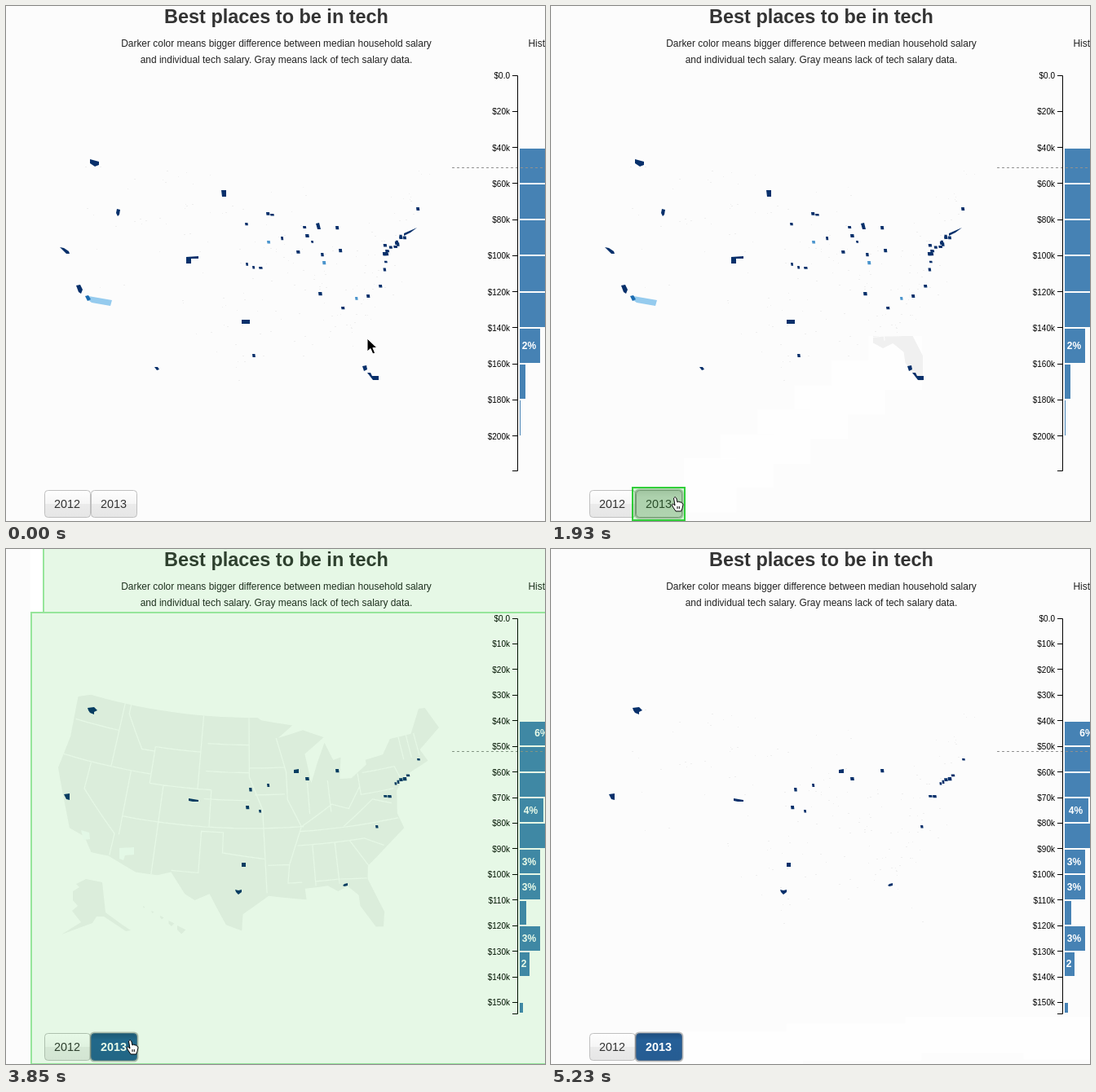
Animation of 661x632 px, one loop 5.67 s. Source, as an HTML page:

```html
<!DOCTYPE html>
<html lang="en">
<head>
<meta charset="utf-8">
<title>Tech salaries</title>
<style>
html, body { margin: 0; width: 100%; height: 100%; overflow: hidden; background: #fcfcfc; }
svg { display: block; width: 100%; height: 100%; font-family: "Liberation Sans", Arial, sans-serif; }
.mid { text-anchor: middle; }
.axis { fill: none; stroke: #000; }
.tick { font-size: 10px; text-anchor: end; }
.pct { font-size: 12px; font-weight: bold; fill: #fff; text-anchor: middle; }
.flash rect { fill: #00ce00; fill-opacity: .22; stroke: #00c30c; stroke-width: 2; }
</style>
</head>
<body>
<svg id="stage" viewBox="0 0 661 632">
  <defs>
    <linearGradient id="plain" x2="0" y2="1">
      <stop stop-color="#fefefe"/><stop offset=".5" stop-color="#f5f5f5"/>
      <stop offset=".5" stop-color="#ebebeb"/><stop offset="1" stop-color="#e6e6e6"/>
    </linearGradient>
    <linearGradient id="down" x2="0" y2="1">
      <stop stop-color="#c4c4c4"/><stop offset=".25" stop-color="#d2d2d2"/><stop offset="1" stop-color="#d6d6d6"/>
    </linearGradient>
    <linearGradient id="chosen" x2="0" y2="1">
      <stop stop-color="#1f4f80"/><stop offset=".25" stop-color="#265f97"/><stop offset="1" stop-color="#265c92"/>
    </linearGradient>
    <clipPath id="land"><path id="landShape"/></clipPath>
    <clipPath id="corner"><rect x="395" y="405" width="61" height="55"/></clipPath>
    <g id="country"></g>
  </defs>
  <rect width="661" height="632" fill="#fcfcfc"/>
  <g id="trail" fill="#fefefe"></g>
  <rect id="margin" x="30" width="15" height="77" fill="#fff"/>
  <g id="specks" clip-path="url(#land)" fill="#eee"></g>
  <use id="map" href="#country"/>
  <use id="florida" href="#country" clip-path="url(#corner)"/>
  <g id="year2012"></g>
  <g id="year2013"></g>
  <text class="mid" x="331.5" y="21" font-size="23.45" font-weight="bold" fill="#333">Best places to be in tech</text>
  <g font-size="11.95" fill="#222">
    <text class="mid" x="331.5" y="50">Darker color means bigger difference between median household salary</text>
    <text class="mid" x="331.5" y="70">and individual tech salary. Gray means lack of tech salary data.</text>
    <text x="640.5" y="50">Histogram</text>
  </g>
  <path class="axis" d="M621 85.5H627.5V570.5H621"/>
  <g font-size="14.4" fill="#333">
    <rect x="47.5" y="594.5" width="56" height="33" rx="4" fill="url(#plain)" stroke="#bfbfbf"/>
    <text class="mid" x="75" y="616">2012</text>
    <rect id="glow" x="104" y="594" width="57" height="34" rx="4" fill="none" stroke="#000" stroke-opacity=".25" stroke-width="3"/>
    <rect id="button" x="104.5" y="594.5" width="56" height="33" rx="4"/>
    <text id="label" class="mid" x="132" y="616">2013</text>
  </g>
  <g id="buttonFlash" class="flash"><rect x="100" y="591" width="64" height="40"/></g>
  <g id="pageFlash" class="flash">
    <rect x="46" y="-4" width="640" height="82"/>
    <rect x="31" y="78" width="640" height="554"/>
  </g>
  <path id="arrow" d="M0 0V16L4 12.5 6.8 19 9.6 17.8 6.9 11.5H12Z" fill="#000" stroke="#fff"/>
  <path id="hand" d="M-1.5 1Q0-2 1.8 1L3 6Q5 4 6 6 8 5 8.4 7 10 7 10 9L9 13.5 7.6 17H1L-3 11Q-4.6 8-2.4 8L0 10ZM3 11v3M5.3 11v3" fill="#fff" stroke="#000"/>
</svg>
<script>
const LOOP = 5670;
const HOVER = 1010, REPAINT = 1230, PRESS = 1780, SWITCH = 3390, FADE = 770;
const NAVY = '#08306b', BLUE = '#4b95cd';
const $ = id => document.getElementById(id);

function add(parent, tag, attrs, text) {
  const el = document.createElementNS('http://www.w3.org/2000/svg', tag);
  for (const key in attrs) el.setAttribute(key, attrs[key]);
  if (text) el.textContent = text;
  parent.append(el);
  return el;
}

let seed = 7;
const random = () => (seed = seed * 16807 % 2147483647) / 2147483647;
const between = (a, b) => a + (b - a) * random();

// Albers equal-area conic, standard parallels 29.5 and 45.5
const rad = Math.PI / 180, sin1 = Math.sin(29.5 * rad);
const cone = (sin1 + Math.sin(45.5 * rad)) / 2;
const offset = 1 - sin1 * sin1 + 2 * cone * sin1;
function project(lon, lat) {
  const radius = 647 * Math.sqrt(offset - 2 * cone * Math.sin(lat * rad)) / cone;
  const angle = cone * (lon + 96) * rad;
  return [302.5 + radius * Math.sin(angle), radius * Math.cos(angle) - 506];
}

// Lines run straight in longitude and latitude, so parallels bend on the map
function geoPath(text) {
  const nums = text.trim().split(/\s+/).map(Number);
  const out = [];
  for (let i = 0; i + 3 < nums.length; i += 2) {
    const [lon, lat, lon2, lat2] = nums.slice(i, i + 4);
    const parts = Math.ceil(Math.abs(lon2 - lon) / 2) || 1;
    for (let k = i ? 1 : 0; k <= parts; k++) {
      const point = project(lon + (lon2 - lon) * k / parts, lat + (lat2 - lat) * k / parts);
      out.push(point.map(v => v.toFixed(1)).join(' '));
    }
  }
  return 'M' + out.join('L');
}

// Key points of the coast, clockwise from the north-west
const mainland = geoPath(`-124.7 48.4 -122.8 49 -95.2 49 -94.6 48.7 -89.6 48 -92 46.7 -88 47.4 -84.8 46.4 -88 44.8
  -87.4 41.6 -86.3 43.6 -84.8 45.8 -83.8 43.8 -82.6 44 -83.2 41.7 -81.5 41.6 -79 42.8 -79 43.3 -76.3 43.5 -74.7 45
  -71.4 45 -69.2 47.4 -68.2 47.3 -67 44.8 -70.7 43.1 -70 41.7 -74 40.7 -75.4 39.4 -76 37 -75.5 35.3 -78 33.9
  -81.1 32 -81.4 30.6 -80 26.8 -80.4 25.2 -81.3 25.3 -82.8 27.8 -82.8 29 -84 30.1 -85.3 29.7 -86.5 30.4
  -89.4 30.3 -89.3 29.1 -94 29.7 -97.2 27.7 -97.3 25.9 -99.2 26.5 -101.4 29.8 -103.2 29 -104.5 29.6 -106.5 31.8
  -108.2 31.3 -111 31.3 -114.8 32.5 -117.1 32.5 -118.4 34 -120.6 34.5 -121.9 36.6 -124.4 40.4 -124 44`) + 'Z';

const borders = [
  '-124 46 -117 46', '-124.3 42 -111 42', '-111 45 -104 45', '-111 41 -102 41', '-114 37 -89 37',
  '-117 42 -117 49', '-120 42 -120 39 -114.6 35 -114.7 32.6', '-114 35 -114 42',
  '-116 49 -116 48 -113 44.5 -111 44.5', '-111 41 -111 45', '-109 31.3 -109 41', '-104 41 -104 49',
  '-102 41 -102 37', '-106.5 32 -103 32 -103 36.5 -100 36.5 -100 34.3 -94.5 33.7',
  '-96.6 49 -96.5 42.5 -94.6 39 -94.2 30', '-96.5 43.5 -91.2 43.5', '-95.7 40.6 -91.4 40.6',
  '-92.3 46.7 -91 43 -91 40 -89.3 37 -91.2 33 -91.5 31 -89.7 31', '-94 33 -91.2 33',
  '-89.3 37 -84.8 39.1 -82.5 38.4 -80.5 40.6', '-89.5 36.5 -76 36.5', '-90 35 -83 35 -81 32',
  '-83 35 -81 35 -78.6 33.9', '-88 31 -85 31 -81.5 30.7', '-83.5 36.6 -79 39 -76.5 38.2',
  '-80.5 42 -80.5 39.7 -75.8 39.7', '-79.8 42 -75 42 -74.5 40.7'
].map(geoPath);
for (let lat = 40; lat <= 46; lat += 3) borders.push(geoPath(`-103 ${lat} -96.5 ${lat}`));
for (let lon = -88; lon <= -85; lon += 3) borders.push(geoPath(`${lon} 30.5 ${lon} 35`), geoPath(`${lon} 38.3 ${lon} 41.7`));
for (let lon = -73.4; lon < -70; lon += 1.2) borders.push(geoPath(`${lon} 42.5 ${lon} 45`));

const islands = [0, 1, 2, 3, 4].map(i => {
  const r = 1.2 + i * i * .25;
  return `M${168 + 10.5 * i} ${438 + 6 * i}l${2 * r} ${r}l${-r} ${r}l${-r} ${-r}z`;
}).join('');
const alaska = 'M82 420l8-5-4-4 12-6 20 4 4 37 19 14 12 8-6 1-27-18-9 0-5 8-38 14 24-15-11-14 7-6-6-7z';

$('landShape').setAttribute('d', mainland);
add($('country'), 'path', { d: mainland + alaska + islands, fill: '#f0f0f0' });
add($('country'), 'path', { d: borders.join(''), fill: 'none', stroke: '#fcfcfc', 'stroke-width': 1.2 });
add($('country'), 'path', { d: 'M92 345l10 3 1 8-8 1zM139 367l18-1v9l-11 1-2 6-5-2z', fill: '#f9fcfc' });

for (let i = 0; i < 320; i++) {
  const x = Math.round(60 + 460 * Math.sqrt(random())), y = Math.round(between(185, 470));
  add($('specks'), 'rect', { x, y, width: 1 + Math.round(random()), height: 1 });
}

function counties(group, spots, fill = NAVY) {
  const d = spots.map(([x, y]) => {
    const w = between(2.5, 4.5), h = between(2.5, 4.5);
    return `M${x} ${y}h${w}l.5 ${h}h${-w}z`;
  }).join('');
  add(group, 'path', { d, fill });
}

const scatter = (count, [x0, y0], [x1, y1], spread) => Array.from({ length: count }, (_, i) => {
  const k = i / (count - 1);
  return [x0 + (x1 - x0) * k + between(-spread, spread), y0 + (y1 - y0) * k + between(-spread, spread)];
});

function histogram(group, { step, unit, count, bars, median }) {
  const at = i => 85.5 + i * step, edge = i => Math.round(at(i) + .5);
  for (let i = 0; i <= count; i++) {
    add(group, 'path', { class: 'axis', d: `M621 ${Math.round(at(i)) - .5}h6` });
    add(group, 'text', { class: 'tick', x: 618, y: at(i) + 3.5 }, i ? `$${i * unit}k` : '$0.0');
  }
  for (const [bin, width, text] of bars) {
    const height = Math.min(edge(bin + 1) - 2, 569) - edge(bin);
    add(group, 'rect', { x: 630, y: edge(bin), width, height, fill: '#4682b4' });
    if (text) add(group, 'text', { class: 'pct', x: 629 + width / 2, y: at(bin) + step / 2 + 3.5 }, text);
  }
  add(group, 'path', { d: `M547 ${median}H661`, stroke: '#909090', 'stroke-dasharray': '3 3' });
}

const y12 = $('year2012'), y13 = $('year2013');
const bothYears = [[367, 280], [404, 270], [294, 315], [310, 320]];

add(y12, 'path', { fill: NAVY, d: 'M103 188l11 3v4l-5 2-6-4zM136 249l4 1-1 6-2 2-2-4zM264 226h6v8h-5zM66 296l5 1 6 4 1 3h-4zM86 343l5-1 3 6-2 5-3-2zM182 443l4 0 2 3-3 1zM221 308l15-1v3h-9v6h-6zM289 385h10v5h-10zM380 267l4-1 2 8h-4zM488 279l16-7-8 6-8 4zM437 442l5-1 1 5-4 2zM443 450h4l2 4h8v5h-7z' });
add(y12, 'path', { fill: '#95cbee', d: 'M101 356l29 5-2 7-23-4-4-3z' });
add(y12, 'path', { fill: '#1c6cb1', d: 'M97 356l4-1 3 5-4 2z' });
counties(y12, [...bothYears, [293, 266], [319, 253], [324, 255], [337, 283], [356, 300], [302, 319], [302, 427],
  [364, 270], [374, 288], [386, 303], [408, 298], [383, 351], [411, 369], [442, 354], [457, 342], [503, 247]]);
counties(y12, scatter(12, [462, 304], [487, 280], 2.5));
counties(y12, scatter(4, [462, 322], [464, 292], 1.5));
counties(y12, [[320, 288], [388, 313], [428, 357]], BLUE);

add(y13, 'path', { fill: NAVY, d: 'M100 195l8-1 4 4-4 2v3l-5-2-2-3zM71 301l7-1v8l-4-1zM224 306l12 2v2h-7l-5-1zM289 385h5v5h-5zM353 271l6-1v5h-6zM281 418l4 1 4-1v3l-4 3-3-3zM413 413l2-2 4-1v3l-4 1z' });
counties(y13, [...bothYears, [298, 293], [320, 288], [453, 339], [504, 257]]);
counties(y13, scatter(5, [476, 287], [490, 277], 1));
counties(y13, scatter(2, [463, 302], [468, 302], 0));

histogram(y12, {
  step: 44.27, unit: 20, count: 10, median: 198.5,
  bars: [[2, 40], [3, 40], [4, 40], [5, 40], [6, 40], [7, 25, '2%'], [8, 7], [9, 1]]
});
histogram(y13, {
  step: 31.43, unit: 10, count: 15, median: 248.5,
  bars: [[4, 56, '6%'], [5, 60], [6, 60], [7, 29, '4%'], [8, 60], [9, 25, '3%'], [10, 25, '3%'],
    [11, 8], [12, 25, '3%'], [13, 12, '2'], [15, 4]]
});

// Pointer stops: [time, x, y]
const stops = [[360, 443, 408], [910, 171, 588], [1080, 152, 603], [4250, 152, 603],
  [4600, 590, 577], [4670, 652, 591], [4950, 649, 606], [5230, 638, 634]];

function pointerAt(t) {
  const i = stops.findIndex(s => s[0] > t);
  if (i === 0) return stops[0].slice(1);
  if (i < 0) return stops[stops.length - 1].slice(1);
  const [t0, x0, y0] = stops[i - 1], [t1, x1, y1] = stops[i];
  const k = (t - t0) / (t1 - t0);
  return [x0 + (x1 - x0) * k, y0 + (y1 - y0) * k];
}

// Faint lighter patches, each around the stretch the pointer has just covered
const patches = [];
function leaveTrail(from, to, until, step) {
  for (let t = from; t < to; t += step) {
    const [xa, ya] = pointerAt(t), [xb, yb] = pointerAt(t + step);
    const el = add($('trail'), 'rect', {
      x: Math.min(xa, xb) - 8, y: Math.min(ya, yb) - 3,
      width: Math.abs(xb - xa) + 20, height: Math.abs(yb - ya) + 36
    });
    patches.push({ from: t + step, until, el });
  }
}
leaveTrail(360, 910, SWITCH, 92);
leaveTrail(4250, 4600, LOOP, 116);

const show = (el, on) => el.setAttribute('visibility', on ? 'visible' : 'hidden');
const fade = (t, start) => t < start ? 0 : Math.max(0, 1 - (t - start) / FADE);

function draw(t) {
  const switched = t >= SWITCH, pressed = t >= PRESS;
  const tint = fade(t, SWITCH);
  show(y12, !switched);
  show(y13, switched);
  show($('map'), tint > 0);
  show($('margin'), tint > 0);
  show($('specks'), tint === 0);
  show($('florida'), t >= 400 && !switched);
  patches.forEach(p => show(p.el, t >= p.from && t < p.until));

  const button = $('button'), label = $('label');
  button.setAttribute('fill', switched ? 'url(#chosen)' : pressed ? 'url(#down)' : t >= HOVER ? '#e6e6e6' : 'url(#plain)');
  button.setAttribute('stroke', switched ? '#4a6a8c' : pressed ? '#909090' : '#bfbfbf');
  label.setAttribute('fill', switched ? '#fff' : '#333');
  label.setAttribute('font-weight', switched ? 'bold' : 'normal');
  show($('glow'), pressed);

  $('buttonFlash').setAttribute('opacity', switched ? 0 : fade(t, pressed ? PRESS : REPAINT));
  $('pageFlash').setAttribute('opacity', tint);

  const [x, y] = pointerAt(t), hand = t >= HOVER;
  for (const id of ['arrow', 'hand']) $(id).setAttribute('transform', `translate(${x.toFixed(1)} ${y.toFixed(1)})`);
  show($('arrow'), !hand);
  show($('hand'), hand && t < 5230);
}

const begin = performance.now();
function tick() {
  draw((performance.now() - begin) % LOOP);
  requestAnimationFrame(tick);
}
tick();
</script>
</body>
</html>
```
